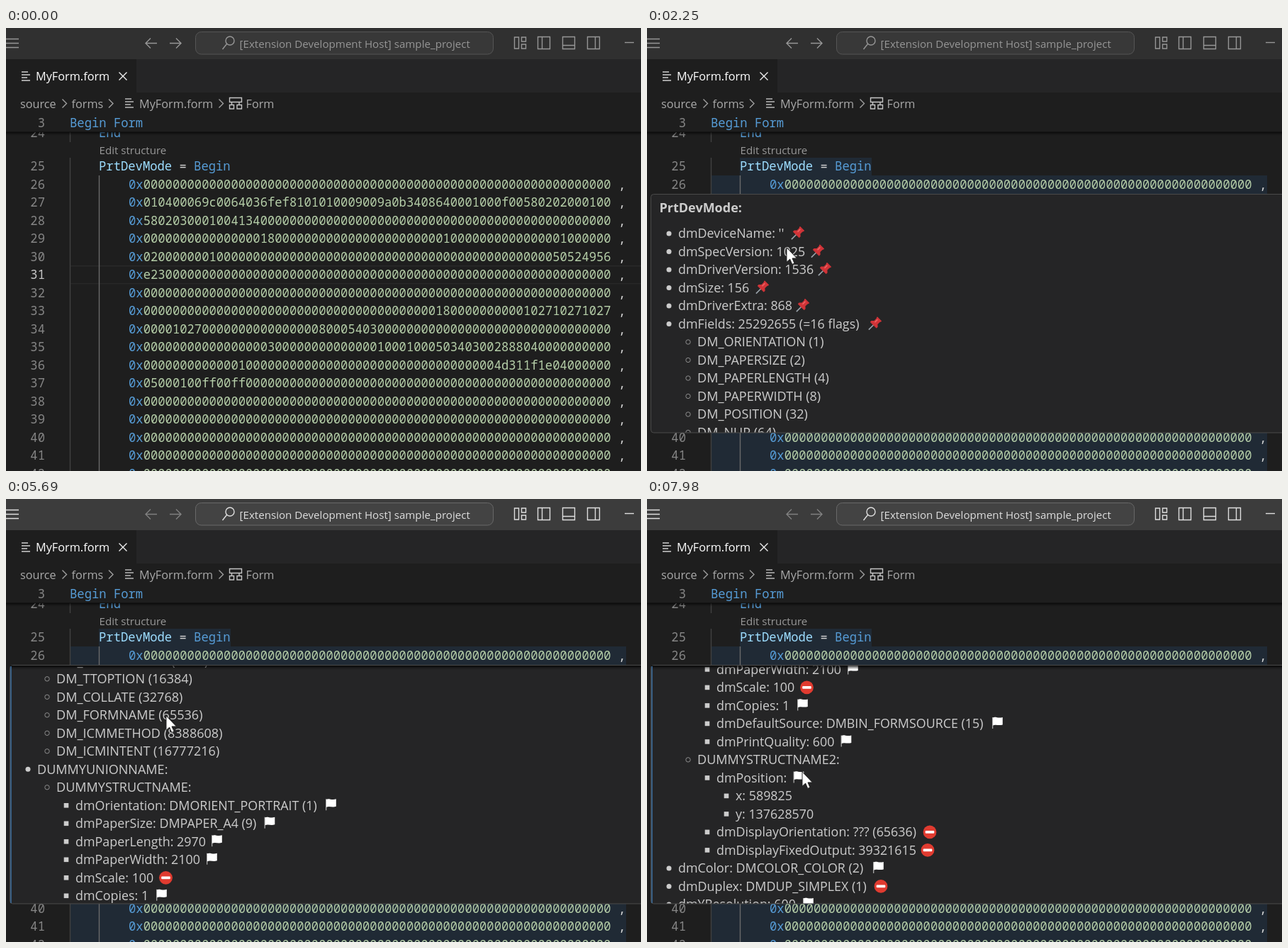
Write an HTML page that moves like this. It is 896 by 625 pixels and loops after 8 s.

```html
<!DOCTYPE html>
<html lang="en">
<head>
<meta charset="utf-8">
<title>Editor hover</title>
<style>
  html, body { margin: 0; width: 100%; height: 100%; overflow: hidden; background: #1e1e1e; }
  svg { display: block; width: 896px; height: 625px; }
  text { white-space: pre; }
  .ui { font-family: "Open Sans", "Noto Sans", sans-serif; }
  .mono { font: 17.2px "Noto Sans Mono", "DejaVu Sans Mono", monospace; font-variant-ligatures: none; }
  .line { fill: none; stroke-width: 1.4; }
  .kw { fill: #569cd6; } .num { fill: #b5cea8; } .var { fill: #9cdcfe; } .op { fill: #d4d4d4; }
  .no { fill: #858585; text-anchor: end; }
  #title { --bg: #303030; --fg: #969696; --nav: #969696; --edge: #555; --box: #383838; }
  #title.on { --bg: #3c3c3c; --fg: #dedede; --nav: #808080; --edge: #686868; --box: #434343; }
</style>
</head>
<body>
<svg id="stage" viewBox="0 0 896 625"></svg>
<script>
const LOOP = 8000, ROW = 25.5, NOTCH = 67.1;

const ui = (x, y, size, fill, s, extra = '') =>
  `<text class="ui" x="${x}" y="${y}" font-size="${size}" fill="${fill}" ${extra}>${s}</text>`;
const mono = (x, y, s, cls = '') => `<text class="mono ${cls}" x="${x}" y="${y}">${s}</text>`;
const span = (cls, s) => `<tspan class="${cls}">${s}</tspan>`;
const rect = (x, y, w, h, fill, extra = '') =>
  `<rect x="${x}" y="${y}" width="${w}" height="${h}" fill="${fill}" ${extra}/>`;
const line = (d, stroke, extra = '') => `<path class="line" d="${d}" stroke="${stroke}" ${extra}/>`;
// dark bands that fade out downwards
const shadow = (x, y, w, alphas) =>
  alphas.map((a, i) => rect(x, y + i, w, 1, '#000', `opacity="${a}"`)).join('');

// ---------- editor ----------
const z = n => '0'.repeat(n);
const hex = [
  '', '010400069c0064036fef8101010009009a0b3408640001000f00580202000100',
  '5802030001004134', z(16) + '18' + z(23) + '1' + z(15) + '1',
  '0200000001' + z(46) + '50524956', 'e230', '',
  z(40) + '18' + z(10) + '102710271027', '00001027' + z(16) + '80005403',
  z(17) + '3' + z(14) + '100010005034030028880400',
  z(13) + '1' + z(34) + '4d311f1e04', '05000100ff00ff',
  '', '', '', '', ''
].map(s => s.padEnd(64, '0'));

function editor() {
  const base = n => 201.3 + (n - 25) * ROW;
  let s = rect(0, 0, 896, 625, '#1e1e1e');
  s += `<g id="mark" fill="#202a35"><path d="M131 183H317V208H875V625H90V208H131Z"/></g>`;
  s += line('M90 335.8H896M90 360.6H896', '#292929', 'stroke-width="2"');
  s += line('M90.5 140V161M90.5 183V625', '#404040');
  s += line('M131.5 208V625', '#6a6a6a');
  s += mono(55, 154.3, '24', 'no') + mono(131, 154.3, 'End', 'kw');
  s += ui(131.5, 178.3, 15.1, '#999', 'Edit structure');
  s += mono(55, base(25), '25', 'no');
  s += mono(131, base(25), span('var', 'PrtDevMode') + span('op', ' = ') + span('kw', 'Begin'));
  hex.forEach((h, i) => {
    const n = 26 + i, y = base(n);
    s += `<text class="mono no" x="55" y="${y}" ${n === 31 ? 'style="fill:#c6c6c6"' : ''}>${n}</text>`;
    s += mono(173, y, span('kw', '0x') + span('num', h) + span('op', ' ,'));
  });
  // sticky line
  s += rect(0, 44, 896, 103, '#1e1e1e') + shadow(0, 146.5, 896, [.75, .55, .35, .18, .07]);
  return s + mono(55, 139.6, '3', 'no') + mono(90, 139.6, 'Begin Form', 'kw');
}

// ---------- tabs, breadcrumbs, title ----------
const fileIcon = (x, y, c) => line(`M${x} ${y}h9M${x} ${y + 4}h12M${x} ${y + 8}h8M${x} ${y + 12}h12`, c);
const chevron = x => line(`M${x} 100.5l6 6l-6 6`, '#a0a0a0');

function tabs() {
  return rect(184, 44, 712, 47, '#252526') +
    fileIcon(22, 62, '#d0d0d0') + ui(42, 74.3, 16.25, '#fff', 'MyForm.form') +
    line('M159.5 62.5l11 11m0 -11l-11 11', '#eee', 'stroke-width="1.6"') +
    ui(20, 112.6, 16.25, '#a9a9a9', 'source') + chevron(79.5) +
    ui(92.5, 112.6, 16.25, '#a9a9a9', 'forms') + chevron(145) +
    fileIcon(168, 100, '#b8b8b8') + ui(188, 112.6, 16.25, '#a9a9a9', 'MyForm.form') + chevron(300.5) +
    line('M315.5 98.5h17v6h-17zM315.5 108.5h6v5.5h-6zM326 108.5h6.5v5.5h-6.5zM318.5 104.5v4M329 104.5v4', '#c5c5c5') +
    ui(338.5, 112.6, 16.25, '#a9a9a9', 'Form');
}

function title() {
  const fg = 'var(--fg)', nav = 'var(--nav)';
  const css = (d, c) => `<path class="line" d="${d}" style="stroke:${c}"/>`;
  const pane = (x, cut) => css(`M${x} 12.5h17v17h-17z${cut}`, fg);
  return `<g id="title"><rect width="896" height="44" style="fill:var(--bg)"/>` +
    css('M0 15.5H18M0 21.5H18M0 27.5H18', fg) +
    css('M213 21.5H197M204 14.5l-7 7l7 7M231 21.5H247M240 14.5l7 7l-7 7', nav) +
    `<rect x="267.5" y="5.5" width="420" height="31.5" rx="8" style="fill:var(--box);stroke:var(--edge)"/>` +
    css('M322 18a6 6 0 1 1 -12 0a6 6 0 1 1 12 0M311.5 22.5L305.5 30', fg) +
    `<text class="ui" x="329.5" y="27.6" font-size="15.13" style="fill:${fg}">[Extension Development Host] sample_project</text>` +
    css('M717.5 13h6v16h-6zM727.5 13h6v6h-6zM727.5 23h6v6h-6z', fg) +
    pane(750.5, 'M756.5 12.5v17') + pane(785.5, 'M785.5 24.5h17') + pane(820.5, 'M831.5 12.5v17') +
    css('M873 20.5H886', fg) + '</g>';
}

// ---------- hover ----------
const PIN = 'pin', FLAG = 'flag', STOP = 'stop';
// level, text, icon, icon centre
const rows = [
  [1, "dmDeviceName: ''", PIN, 212], [1, 'dmSpecVersion: 1025', PIN, 240],
  [1, 'dmDriverVersion: 1536', PIN, 250], [1, 'dmSize: 156', PIN, 162],
  [1, 'dmDriverExtra: 868', PIN, 219], [1, 'dmFields: 25292655 (=16 flags)', PIN, 321],
  ...`ORIENTATION (1)|PAPERSIZE (2)|PAPERLENGTH (4)|PAPERWIDTH (8)|POSITION (32)|NUP (64)|COPIES (256)|DEFAULTSOURCE (512)|PRINTQUALITY (1024)|COLOR (2048)|YRESOLUTION (8192)|TTOPTION (16384)|COLLATE (32768)|FORMNAME (65536)|ICMMETHOD (8388608)|ICMINTENT (16777216)`
    .split('|').map(s => [2, 'DM_' + s]),
  [1, 'DUMMYUNIONNAME:'], [2, 'DUMMYSTRUCTNAME:'],
  [3, 'dmOrientation: DMORIENT_PORTRAIT (1)', FLAG, 458.5], [3, 'dmPaperSize: DMPAPER_A4 (9)', FLAG, 372],
  [3, 'dmPaperLength: 2970', FLAG, 297.5], [3, 'dmPaperWidth: 2100', FLAG, 290.5],
  [3, 'dmScale: 100', STOP, 225.5], [3, 'dmCopies: 1', FLAG, 219.5],
  [3, 'dmDefaultSource: DMBIN_FORMSOURCE (15)', FLAG, 494.5], [3, 'dmPrintQuality: 600', FLAG, 281],
  [2, 'DUMMYSTRUCTNAME2:'], [3, 'dmPosition:', FLAG, 214],
  [4, 'x: 589825'], [4, 'y: 137628570'],
  [3, 'dmDisplayOrientation: ??? (65636)', STOP, 399], [3, 'dmDisplayFixedOutput: 39321615', STOP, 396],
  [1, 'dmColor: DMCOLOR_COLOR (2)', FLAG, 326.5], [1, 'dmDuplex: DMDUP_SIMPLEX (1)', STOP, 330],
  [1, 'dmYResolution: 600', FLAG, 227.5]
];
const icons = {
  pin: `<g transform="rotate(45)"><path d="M0 1V11.5" stroke="#9aa3ab" stroke-width="1.6"/>
    <path d="M-4 -9.5H4L3 -7V-2.5L5.8 0V2H-5.8V0L-3 -2.5V-7Z" fill="#d13438" stroke="#d13438" stroke-linejoin="round"/>
    <path d="M-1.3 -7.5V-2" stroke="#ef6b6b" stroke-width="1.3"/></g>`,
  flag: `<path d="M-6.8 -9V7" stroke="#b5b5b5" stroke-width="1.2"/>
    <path d="M-6.5 -8.5C-3 -10.5 1 -7 7.3 -9V1.5C2 3.5 -2 .5 -6.5 2.5Z" fill="#fff"/>`,
  stop: `<circle r="9.4" fill="#e03b30"/><rect x="-6.3" y="-1.9" width="12.6" height="3.8" rx="1" fill="#fff"/>`
};
const bullet = (level, y) => {
  const x = 4 + 27 * level;
  if (level === 1) return `<circle cx="${x}" cy="${y}" r="3.5" fill="#ccc"/>`;
  if (level === 2) return `<circle cx="${x}" cy="${y}" r="3.2" fill="none" stroke="#8c8c8c"/>`;
  return rect(x - 3.3, y - 3.3, 6.6, 6.6, '#ccc');
};

function hover() {
  let s = ui(17.5, 260, 18, '#ccc', 'PrtDevMode:', 'font-weight="700"');
  rows.forEach(([level, text, icon, x], i) => {
    const y = 290 + i * ROW, size = text.startsWith('D') ? 18.05 : 17.85;
    s += bullet(level, y) + ui(17 + 27 * level, y + 6.4, size, '#ccc', text);
    if (icon) s += `<g transform="translate(${x} ${y})">${icons[icon]}</g>`;
  });
  return `<clipPath id="clip"><rect x="6" y="235" width="890" height="335.5"/></clipPath><g id="hover">` +
    rect(5.5, 234.5, 900, 336.5, '#252526', 'rx="4" stroke="#4a4a4a"') +
    `<g clip-path="url(#clip)"><g id="list">${s}</g></g>` +
    `<g id="depth">${shadow(6, 235, 890, [.7, .55, .4, .25, .12, .05])}</g>` +
    rect(6.3, 236, 1.4, 334, '#3f74a8', 'id="focus"') + '</g>';
}

const cursors = `<path id="beam" class="line" stroke="#dcdcdc" stroke-linecap="round"
    d="M-4 -11.5C-1 -11.5 0 -11 0 -9.5C0 -11 1 -11.5 4 -11.5M0 -9.5V9.5M-4 11.5C-1 11.5 0 11 0 9.5C0 11 1 11.5 4 11.5"/>
  <path id="arrow" d="M0 .8V21.3L4.7 17.1L7.8 24.4L11 23L8 15.9H14.4Z" fill="#fff" stroke="#1a1a1a" stroke-width=".9"/>`;

const $ = id => document.getElementById(id);
$('stage').innerHTML = editor() + tabs() + title() + hover() + cursors;

// ---------- timeline: each entry holds until the next ----------
const beamPath = [[410, 74, 204], [550, 101, 228], [690, 141, 245], [830, 180, 240], [970, 201, 233.5]];
const arrowPath = [
  [1690, 201, 240], [1830, 200, 262], [1970, 199, 285], [2110, 198, 302], [2250, 197, 309],
  [3990, 200, 309], [4130, 206, 308], [4270, 212, 307], [4410, 217, 306], [4560, 221, 306],
  [4700, 224, 305], [4840, 226, 305],
  [7130, 227, 322], [7270, 226, 345], [7410, 223, 370], [7540, 220, 385], [7820, 221, 387], [7980, 219, 384]
];
const scroll = [[0, 0], [2400, 2], [2680, 3], [3550, 4], [5270, 5], [5410, 5.5], [5550, 6], [5690, 7],
  [5990, 8], [6120, 9], [6560, 10], [6700, 10.5], [6850, 11]];
const fade = [[0, 0], [1400, .65], [1540, 1]];

const at = (table, t) => table.findLast(e => e[0] <= t);
const show = (id, on) => $(id).setAttribute('visibility', on ? 'visible' : 'hidden');
const place = (id, p) => {
  show(id, p);
  if (p) $(id).setAttribute('transform', `translate(${p[1]} ${p[2]})`);
};

function draw(t) {
  const notches = at(scroll, t)[1], arrow = at(arrowPath, t);
  show('mark', t >= 1250);
  show('focus', t >= 5130);
  show('depth', notches > 0);
  $('title').setAttribute('class', t >= 4980 ? 'on' : '');
  $('hover').setAttribute('opacity', at(fade, t)[1]);
  $('list').setAttribute('transform', `translate(0 ${-notches * NOTCH})`);
  place('arrow', arrow);
  place('beam', arrow ? null : at(beamPath, t));
}

function tick() {
  draw(performance.now() % LOOP);
  requestAnimationFrame(tick);
}
tick();
</script>
</body>
</html>
```
